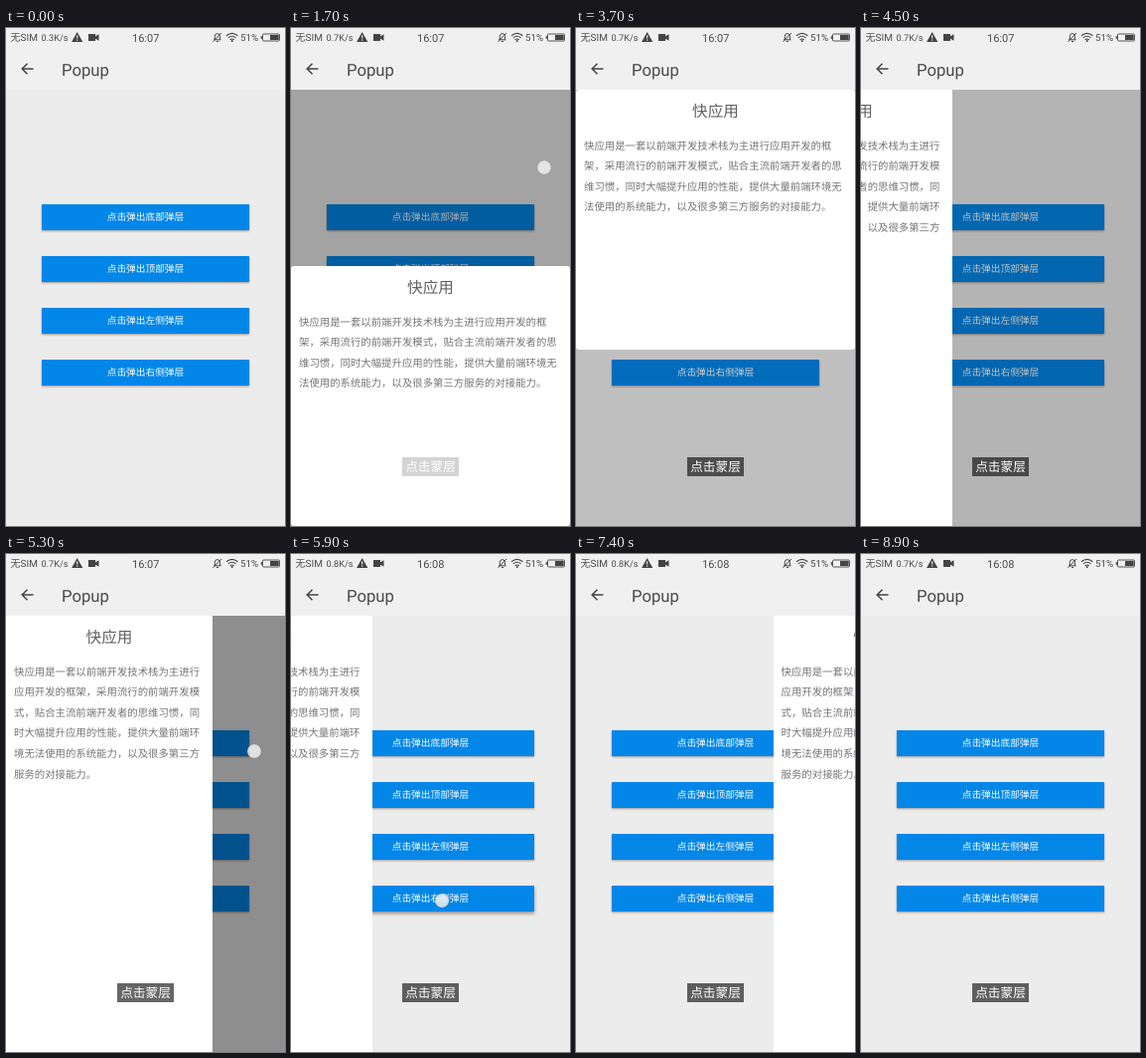
Recreate the animation shown at these times as an HTML page. Size 281x500 px, loop 9 s.

```html
<!DOCTYPE html>
<html lang="zh-CN">
<head>
<meta charset="utf-8">
<title>Popup</title>
<style>
html, body { margin: 0; width: 100%; height: 100%; overflow: hidden; background: #ececec; }
#stage {
  position: relative; width: 281px; height: 500px; overflow: hidden; background: #ececec;
  font-family: "Noto Sans CJK SC", "Noto Sans CJK", sans-serif;
  text-rendering: geometricPrecision;
}
#stage * { box-sizing: border-box; }
.bar { position: absolute; left: 0; top: 0; }
.bar text { font-family: Roboto, "Noto Sans CJK SC", sans-serif; fill: #4a4a4a; }
.page { position: absolute; left: 0; top: 62px; width: 281px; height: 438px; overflow: hidden; }

.btn {
  position: absolute; left: 36px; width: 209px; height: 26px;
  background: #0286e8; color: #fff; font-size: 9.7px; line-height: 25px; text-align: center;
  box-shadow: 0 1px 2px rgba(0, 0, 0, .35);
  animation: press 9s linear calc(var(--t) - 9s) infinite;
}
.mask { position: absolute; inset: 0; background: #000; opacity: 0; animation: mask 9s linear infinite; }

.panel {
  position: absolute; background: #fff; color: #747474;
  transform: translate(var(--away));
  animation: 9s linear infinite;
}
.panel h2 { margin: 0; font-size: 15.6px; font-weight: 400; line-height: 43px; text-align: center; color: #606060; }
.panel p { margin: 0; padding: 2.7px 8px 0; font-size: 10.4px; line-height: 20.6px; }
.low, .top { left: 0; width: 281px; height: 261px; border-radius: 3px; }
.side { top: 0; width: 208px; height: 438px; }
.low { top: 177px; --away: 0, 262px; animation-name: low; }
.top { top: 0; --away: 0, -262px; animation-name: top; }
.left { left: 0; --away: -208px, 0; animation-name: left; }
.right { left: 73px; --away: 208px, 0; animation-name: right; }

.toast {
  position: absolute; left: 112px; top: 431px; width: 57px; height: 19px;
  background: rgba(0, 0, 0, .6); color: #fff; font-size: 12.7px; line-height: 18px; text-align: center;
  white-space: nowrap; opacity: 0; animation: toast 9s linear infinite;
}
.dot {
  position: absolute; width: 14px; height: 14px; margin: -7px; border-radius: 50%;
  background: rgba(240, 240, 238, .86); box-shadow: 0 0 1px rgba(0, 0, 0, .3), inset 0 0 2px rgba(120, 120, 120, .4);
  opacity: 0; animation: tap 9s linear calc(var(--t) - 9s) infinite;
}
.swap { opacity: 0; animation: 9s step-end infinite; }
.slow { animation-name: slow; }
.mid { animation-name: mid; }
.fast { animation-name: fast; }
.before { animation-name: before; }
.after { animation-name: after; }

@keyframes mask {
  0%, 4.444%, 23.222%, 27.278%, 43.778%, 46.667%, 65.556%, 66.667%, 82.222%, 100% { opacity: 0; }
  10%, 17.667%, 32.833%, 38.222%, 52.222%, 60%, 72.222%, 76.667% { opacity: .4; }
}
@keyframes low {
  0%, 24.111%, 100% { transform: translate(var(--away)); }
  6.667% { transform: translate(var(--away)); animation-timing-function: cubic-bezier(.33, .67, .67, 1); }
  11.111% { transform: none; }
  20.778% { transform: none; animation-timing-function: ease-in; }
}
@keyframes top {
  0%, 44.667%, 100% { transform: translate(var(--away)); }
  29.556% { transform: translate(var(--away)); animation-timing-function: cubic-bezier(.33, .67, .67, 1); }
  34% { transform: none; }
  41.333% { transform: none; animation-timing-function: ease-in; }
}
@keyframes left {
  0%, 66.444%, 100% { transform: translate(var(--away)); }
  48.889% { transform: translate(var(--away)); animation-timing-function: cubic-bezier(.33, .67, .67, 1); }
  53.333% { transform: none; }
  63.111% { transform: none; animation-timing-function: ease-in; }
}
@keyframes right {
  0%, 83.111%, 100% { transform: translate(var(--away)); }
  69.111% { transform: translate(var(--away)); animation-timing-function: cubic-bezier(.33, .67, .67, 1); }
  73.333% { transform: none; }
  79.778% { transform: none; animation-timing-function: ease-in; }
}
@keyframes press {
  0%, 5%, 100% { box-shadow: 0 1px 2px rgba(0, 0, 0, .35); }
  1%, 3% { box-shadow: 0 2px 5px rgba(0, 0, 0, .45); }
}
@keyframes tap { 0%, 2.8% { opacity: 1; } 3.9%, 100% { opacity: 0; } }
@keyframes toast { 0%, 18.333% { opacity: 0; } 20.333%, 100% { opacity: 1; } }
@keyframes slow { 0% { opacity: 1; } 6.667%, 100% { opacity: 0; } }
@keyframes mid { 0%, 65.556% { opacity: 0; } 6.667%, 88.889%, 100% { opacity: 1; } }
@keyframes fast { 0%, 88.889%, 100% { opacity: 0; } 65.556% { opacity: 1; } }
@keyframes before { 0% { opacity: 1; } 65.556%, 100% { opacity: 0; } }
@keyframes after { 0% { opacity: 0; } 65.556%, 100% { opacity: 1; } }
</style>
</head>
<body>
<div id="stage">
  <div class="page">
    <div class="btn" style="top:115px;--t:.15s">点击弹出底部弹层</div>
    <div class="btn" style="top:167px;--t:2.27s">点击弹出顶部弹层</div>
    <div class="btn" style="top:219px;--t:4s">点击弹出左侧弹层</div>
    <div class="btn" style="top:271px;--t:5.85s">点击弹出右侧弹层</div>
    <div class="mask"></div>
    <div class="panel low"></div>
    <div class="panel top"></div>
    <div class="panel side left"></div>
    <div class="panel side right"></div>
  </div>

  <svg class="bar" width="281" height="62" viewBox="0 0 281 62">
    <rect width="281" height="62" fill="#f0f0f0"/>
    <text x="4.5" y="13" font-size="10">无SIM</text>
    <g font-size="9.2">
      <text class="swap slow" x="35.5" y="13">0.3K/s</text>
      <text class="swap mid" x="35.5" y="13">0.7K/s</text>
      <text class="swap fast" x="35.5" y="13">0.8K/s</text>
    </g>
    <path d="M71.700 4L77.300 14H66.100Z" fill="#444"/>
    <path d="M71.700 7.300v3.300M71.700 11.500v1.300" stroke="#f0f0f0" stroke-width="1.100"/>
    <path d="M83 6h7v2.300l3.500-2v6.400l-3.500-2V13h-7z" fill="#444"/>
    <g font-size="11">
      <text class="swap before" x="127" y="13.500">16:07</text>
      <text class="swap after" x="127" y="13.500">16:08</text>
    </g>
    <g fill="none" stroke="#444">
      <path d="M209 11.800h7.500M210.300 11.500V8.500a2.600 2.900 0 0 1 5.200 0v3M212 13.500h2M208.500 13.800L217 5"/>
      <path d="M222 7.800q5.700-4.800 11.400 0M223.800 9.900q3.900-3.300 7.800 0M225.700 11.800q2-1.600 4 0" stroke-width="1.200"/>
      <rect x="258.500" y="6" width="17" height="7" rx="1" stroke-width=".9"/>
    </g>
    <circle cx="227.700" cy="13" r="1" fill="#444"/>
    <text x="236" y="13" font-size="9.700">51%</text>
    <path d="M266 7h8.700v5H266zM256.700 8.200h1.400v2.600h-1.400z" fill="#444"/>
    <path d="M27.500 41H16.500M21.500 35.700L16.200 41l5.300 5.300" fill="none" stroke="#444" stroke-width="1.500"/>
    <text x="56" y="47.500" font-size="16.700" fill="#555">Popup</text>
  </svg>

  <div class="toast">点击蒙层</div>
  <i class="dot" style="left:152px;top:192px;--t:.15s"></i>
  <i class="dot" style="left:255px;top:140px;--t:1.48s"></i>
  <i class="dot" style="left:152px;top:245px;--t:2.27s"></i>
  <i class="dot" style="left:230px;top:410px;--t:3.3s"></i>
  <i class="dot" style="left:152px;top:296px;--t:4s"></i>
  <i class="dot" style="left:250px;top:198px;--t:5.29s"></i>
  <i class="dot" style="left:152px;top:348px;--t:5.85s"></i>
  <i class="dot" style="left:40px;top:210px;--t:6.79s"></i>
</div>
<script>
const body = "快应用是一套以前端开发技术栈为主进行应用开发的框架，采用流行的前端开发模式，贴合主流前端开发者的思维习惯，同时大幅提升应用的性能，提供大量前端环境无法使用的系统能力，以及很多第三方服务的对接能力。";
for (const panel of document.querySelectorAll(".panel")) {
  panel.innerHTML = `<h2>快应用</h2><p>${body}</p>`;
}
</script>
</body>
</html>
```
